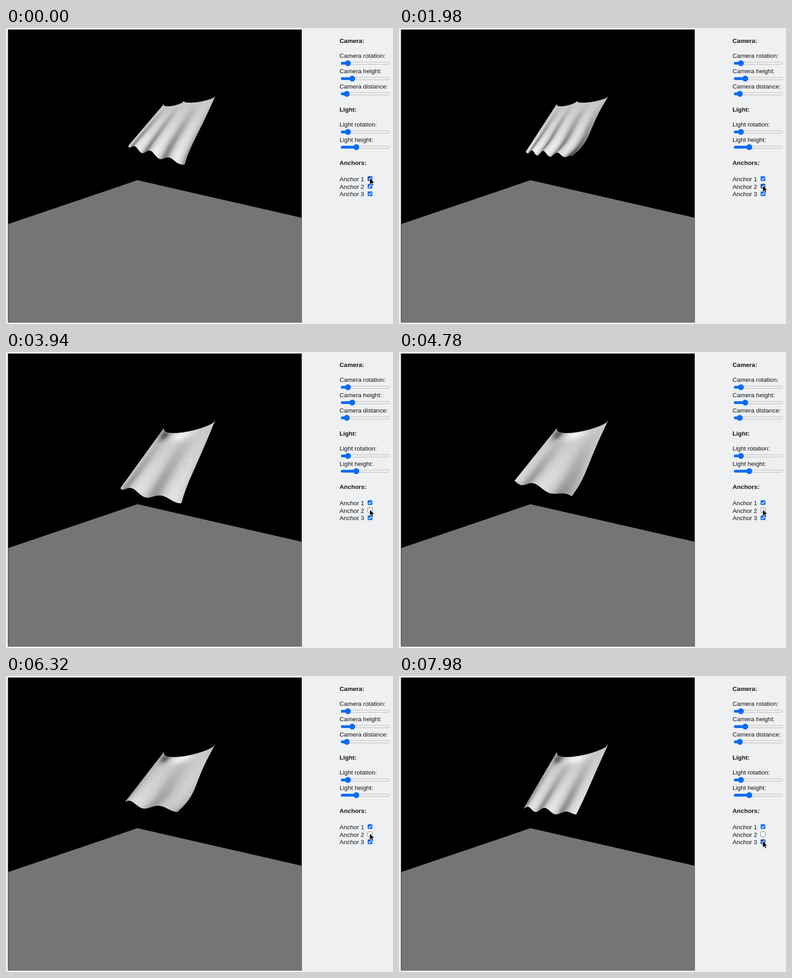
Write an HTML page with a canvas that moves like this. It is 854x655 px and loops after 8 s.

```html
<!DOCTYPE html>
<html lang="en">
<head>
<meta charset="utf-8">
<title>Cloth simulation</title>
<style>
  html, body { margin: 0; width: 100%; height: 100%; overflow: hidden; background: #eef0f2; }
  svg, canvas { position: absolute; left: 0; top: 0; display: block; }
  text { font: 13.6px "Liberation Sans", Arial, sans-serif; fill: #111; }
  .title { font-weight: bold; }
</style>
</head>
<body>
<svg id="stage" width="854" height="655">
  <rect x="4.4" y="3.4" width="648.2" height="648.2" fill="#000"/>
  <path d="M5.2 433.8 L290 336.8 L652 419.7 V651 H5.2 Z" fill="#757575"/>
  <g id="panel"></g>
  <path id="cursor" d="M0 0 V14.3 L3.3 11.2 L5.6 16.4 L8 15.3 L5.8 10.3 H10.4 Z"
        fill="#000" stroke="#fff" stroke-width=".8"/>
</svg>
<canvas id="cloth" width="854" height="655"></canvas>
<script>
const LOOP = 8000, RELEASE = 2500;
const panel = document.getElementById('panel');
const cursor = document.getElementById('cursor');
const ctx = document.getElementById('cloth').getContext('2d');

const { PI, sin, cos, sqrt, abs, max, min, exp } = Math;
const lerp = (a, b, p) => a + (b - a) * p;
const clamp = x => max(0, min(1, x));
const smooth = p => p * p * (3 - 2 * p);
const ramp = (t, from, to) => smooth(clamp((t - from) / (to - from)));
const bump = (x, center, width) => exp(-(((x - center) / width) ** 2));

function add(tag, attrs, text = '') {
  const el = document.createElementNS('http://www.w3.org/2000/svg', tag);
  for (const key in attrs) el.setAttribute(key, attrs[key]);
  el.textContent = text;
  return panel.appendChild(el);
}
const label = (text, y, type = '') => add('text', { x: 736, y, class: type }, text);

function slider(text, y, thumb) {
  label(text, y - 11.7);
  add('rect', { x: 739.5, y: y - 2.7, width: 107, height: 5.4, rx: 2.7, fill: '#efefef', stroke: '#b0b0b4', 'stroke-width': .9 });
  add('rect', { x: 739, y: y - 3, width: thumb - 739, height: 6, rx: 3, fill: '#0a6cf5' });
  add('circle', { cx: thumb, cy: y, r: 6.5, fill: '#0a6cf5' });
}

function checkbox(text, y) {
  label(text, y + 5.2);
  const box = add('rect', { x: 798, y: y - 5.5, width: 10.5, height: 10.5, rx: 2 });
  const tick = add('path', { d: `M800.2 ${y} l2.2 2.3 l4 -5`, fill: 'none', stroke: '#fff', 'stroke-width': 1.7 });
  return (checked, hovered) => {
    box.setAttribute('fill', !checked ? '#fff' : hovered ? '#0a50b8' : '#0a6cf5');
    box.setAttribute('stroke', checked ? 'none' : '#707074');
    tick.setAttribute('visibility', checked ? 'visible' : 'hidden');
  };
}

label('Camera:', 32.7, 'title');
slider('Camera rotation:', 78, 754.5);
slider('Camera height:', 112, 764);
slider('Camera distance:', 145.7, 752);
label('Light:', 185.2, 'title');
slider('Light rotation:', 230, 754.5);
slider('Light height:', 263.7, 773);
label('Anchors:', 303.2, 'title');
const anchors = [333.5, 350.3, 367].map((y, i) => checkbox('Anchor ' + (i + 1), y));

// Lower corners, then the hem's waves, crest position and depth, and the right edge's bulge.
const pose = (time, left, right, waves, crest, depth, bulge) =>
  ({ time, values: [...left, ...right, waves, crest, depth, bulge] });
const poses = [
  pose(0, [270, 261], [394, 302], 3.3, .5, 6, -3),
  pose(1100, [271, 264], [374, 283], 3.3, .48, 6, 15),
  pose(2920, [290, 285], [390, 284], 4.2, .5, 6, 5),
  pose(3940, [253, 301], [387, 334], 2, .27, 7, -3),
  pose(5720, [257, 267], [374, 302], 1.7, .66, 6, 15),
  pose(6980, [270, 292], [384, 298], 1.5, .88, 8, 5),
  pose(7980, [276, 292], [391, 306], 2.7, .88, 6, 1)
];

function clothAt(t) {
  const next = max(1, poses.findIndex(p => p.time > t));
  const a = t < poses.at(-1).time ? poses[next - 1] : poses.at(-1);
  const b = t < poses.at(-1).time ? poses[next] : a;
  const p = ramp(t, a.time, b.time + .001);
  const [lx, ly, rx, ry, waves, crest, depth, bulge] = a.values.map((v, i) => lerp(v, b.values[i], p));
  const loose = ramp(t, RELEASE, RELEASE + 700);
  const phase = u => 2 * PI * waves * (u - crest);

  function point(u, v) {
    const s = u ** 1.36; // perspective foreshortening
    const sag = lerp(6.5 * sqrt(abs(sin(2 * PI * u))), 15.5 * sqrt(abs(sin(PI * u))), loose);
    const hem = -depth * cos(phase(u)) * sqrt(abs(sin(PI * u)));
    const x = lerp(lerp(348, 461, s), lerp(lx, rx, s), v);
    const y = lerp(lerp(169, 152, s) + sag, lerp(ly, ry, s), v);
    return [x + bulge * s * sin(PI * v ** 2.5), y + hem * v * v];
  }

  function shade(u, v) {
    const fold = sin(phase(u)) * depth * waves / 20 * v;
    const curl = max(0, bulge) * 6 * u ** 8 * v ** 3;
    const sheen = 45 * bump(u, .5, .2) - 110 * bump(u, .13, .12);
    return 206 + fold * (fold > 0 ? 38 : 75) - curl + loose * sheen * bump(v, .05, .1);
  }
  return { point, shade };
}

const COLS = 48, ROWS = 32;
function drawCloth(t) {
  const { point, shade } = clothAt(t);
  ctx.clearRect(0, 0, 854, 655);
  ctx.lineWidth = .5;
  for (let r = 0; r < ROWS; r++) {
    for (let c = 0; c < COLS; c++) {
      const u = c / COLS, v = r / ROWS, du = 1 / COLS, dv = 1 / ROWS;
      const g = Math.round(max(15, min(248, shade(u + du / 2, v + dv / 2))));
      ctx.fillStyle = ctx.strokeStyle = `rgb(${g},${g},${g})`;
      ctx.beginPath();
      ctx.moveTo(...point(u, v));
      ctx.lineTo(...point(u + du, v));
      ctx.lineTo(...point(u + du, v + dv));
      ctx.lineTo(...point(u, v + dv));
      ctx.closePath();
      ctx.fill();
      ctx.stroke();
    }
  }
}

function drawPanel(t) {
  const y = 332 + 16.5 * ramp(t, 500, 900) + 10.5 * ramp(t, 6750, 6950) + 6.5 * ramp(t, 7300, 7600);
  cursor.setAttribute('transform', `translate(802.7 ${y})`);
  anchors[0](true, y < 339);
  anchors[1](t < RELEASE, y > 345 && y < 356);
  anchors[2](true, y > 361);
}

function frame() {
  const t = performance.now() % LOOP;
  drawCloth(t);
  drawPanel(t);
  requestAnimationFrame(frame);
}
frame();
</script>
</body>
</html>
```
